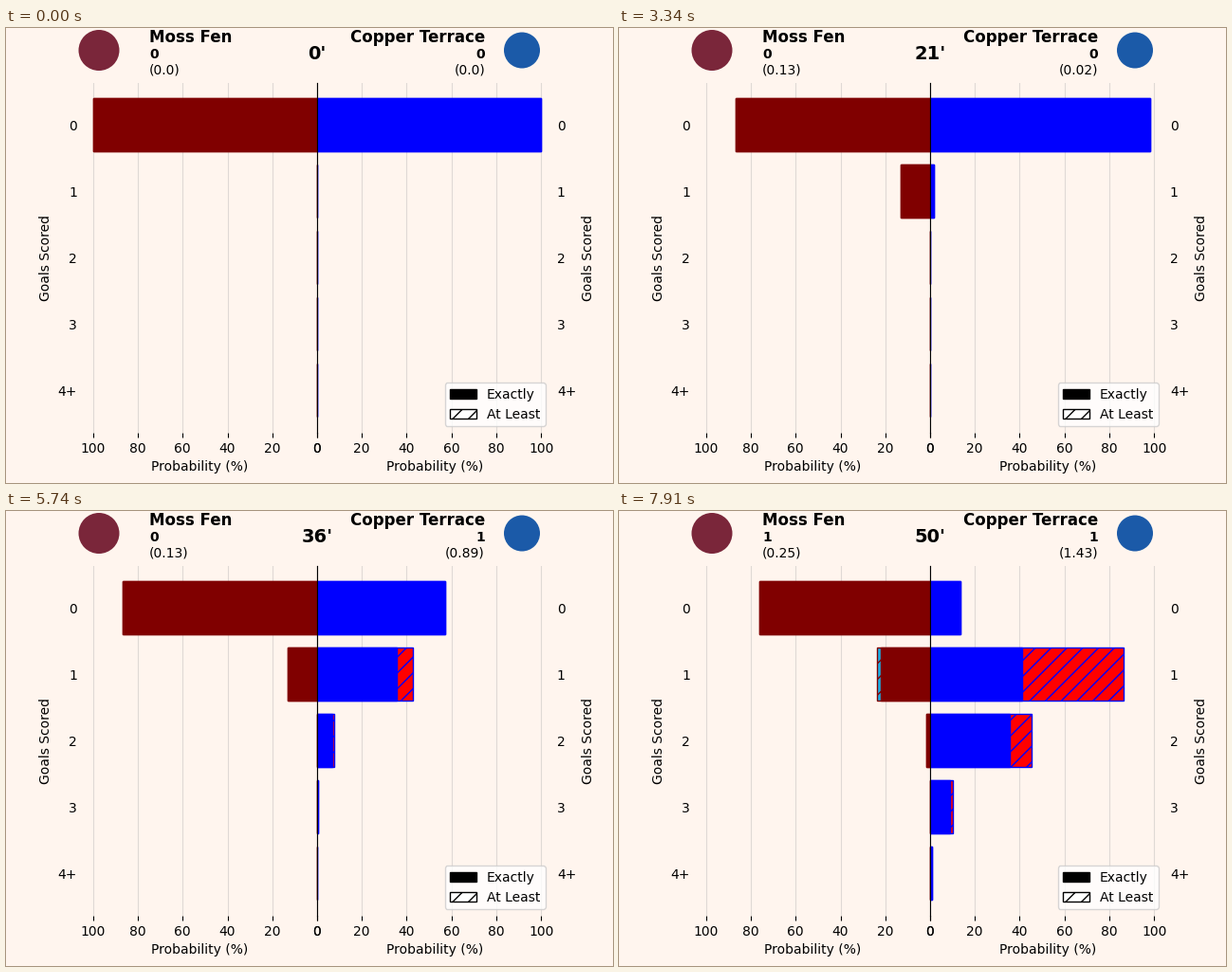
Animation, 640 px wide and 480 px high, one loop 8 s. Source, as a matplotlib script:

```python
import matplotlib.pyplot as plt
from matplotlib.animation import FuncAnimation
from matplotlib.patches import Circle, Patch

W, H = 640, 480
LOOP, STEP = 8000, 25
MINUTE, TWEEN, TWEENS = 160, 30, 5
BG = "#fff5ee"
ROWS = range(5)

# (minute, side, chance quality, scored)
SHOTS = [
    (4, 0, 0.133, 0),
    (9, 1, 0.018, 0),
    (30, 1, 0.126, 0),
    (34, 1, 0.055, 0),
    (35, 1, 0.055, 0),
    (36, 1, 0.636, 1),
    (44, 1, 0.05, 0),
    (46, 1, 0.49, 0),
    (48, 0, 0.12, 1),
]
SHOT_MINUTES = {s[0] for s in SHOTS}


def shots_until(side, minute):
    return [s for s in SHOTS if s[1] == side and s[0] <= minute]


def goal_odds(side, minute):
    """Chance of exactly n and of at least n goals, for each row."""
    dist = [1.0]
    for _, _, p, _ in shots_until(side, minute):
        dist = [a * (1 - p) + b * p for a, b in zip(dist + [0], [0] + dist)]
    dist += [0] * 5
    least = [sum(dist[n:]) for n in ROWS]
    exact = dist[:4] + [least[4]]
    least[0] = exact[0]
    return exact, least


def build_schedule():
    """List of (start time, minute, tween fraction)."""
    steps, t, minute = [], 0, 0
    while t < LOOP:
        if minute in SHOT_MINUTES:
            for k in range(TWEENS):
                steps.append((t, minute, (k + 1) / TWEENS))
                t += TWEEN
        else:
            steps.append((t, minute, 1))
            t += MINUTE
        minute += 1
    return steps


SCHEDULE = build_schedule()

fig, axes = plt.subplots(1, 2, figsize=(W / 100, H / 100), dpi=100, facecolor=BG)
fig.subplots_adjust(left=0.125, right=0.9, bottom=0.11, top=0.88, wspace=0)


def label(x, y, text, size=10, weight="normal", ha="left"):
    return fig.text(x / W, 1 - y / H, text, size=size, weight=weight, ha=ha)


def style_axes(ax, side):
    ax.set_facecolor(BG)
    ax.set_xlim((105, 0) if side == 0 else (0, 105))
    ax.set_ylim(4.64, -0.64)
    ax.set_xticks(range(0, 101, 20))
    ax.set_yticks(ROWS, ["0", "1", "2", "3", "4+"])
    ax.set_xlabel("Probability (%)")
    ax.set_ylabel("Goals Scored")
    ax.set_axisbelow(True)
    ax.grid(axis="x", alpha=0.4)
    if side == 1:
        ax.yaxis.tick_right()
        ax.yaxis.set_label_position("right")
    ax.tick_params(axis="y", length=0)
    inner = "right" if side == 0 else "left"
    for name, spine in ax.spines.items():
        spine.set_visible(name == inner)


class Team:
    def __init__(self, side, name, main, second, x, badge):
        self.side = side
        ax = axes[side]
        style_axes(ax, side)
        ax.set_position([(80 + 248 * side) / W, 0.11, 248 / W, 0.77])
        zeros = [0] * 5
        self.least = ax.barh(ROWS, zeros, color=second, edgecolor=main, hatch="//")
        self.exact = ax.barh(ROWS, zeros, color=main, edgecolor=main)
        ha = "left" if side == 0 else "right"
        label(x, 15, name, 12, "bold", ha)
        self.score = label(x, 32.5, "0", 10, "bold", ha)
        self.xg = label(x, 49, "(0.0)", ha=ha)
        cx, cy, r, color = badge
        fig.add_artist(Circle((cx, H - cy), r, color=color, lw=0, transform=None))

    def show(self, minute, f):
        before = goal_odds(self.side, minute - 1)
        after = goal_odds(self.side, minute)
        for bars, old, new in zip((self.exact, self.least), before, after):
            for bar, a, b in zip(bars, old, new):
                bar.set_width(100 * (a + (b - a) * f))
        shots = shots_until(self.side, minute)
        self.score.set_text(str(sum(s[3] for s in shots)))
        self.xg.set_text(f"({round(sum((s[2] for s in shots), 0.0), 2)})")


teams = [
    Team(0, "Moss Fen", "#800000", "#1bb1e7", 151, (98, 23.5, 21.5, "#7a263a")),
    Team(1, "Copper Terrace", "#0000ff", "#ff0000", 505, (544, 23.5, 19, "#1b5aa8")),
]
clock = label(328, 33, "0'", 14, "bold", "center")

axes[1].legend(
    handles=[
        Patch(facecolor="black", edgecolor="black", label="Exactly"),
        Patch(facecolor="white", edgecolor="black", hatch="//", label="At Least"),
    ],
    loc="lower right",
)


def update(i):
    t = i * STEP + 16
    _, minute, f = [s for s in SCHEDULE if s[0] <= t][-1]
    for team in teams:
        team.show(minute, f)
    clock.set_text(f"{minute}'")
    return []


anim = FuncAnimation(fig, update, frames=LOOP // STEP, interval=STEP,
                     repeat=True, repeat_delay=0, blit=False)
plt.show()
```
